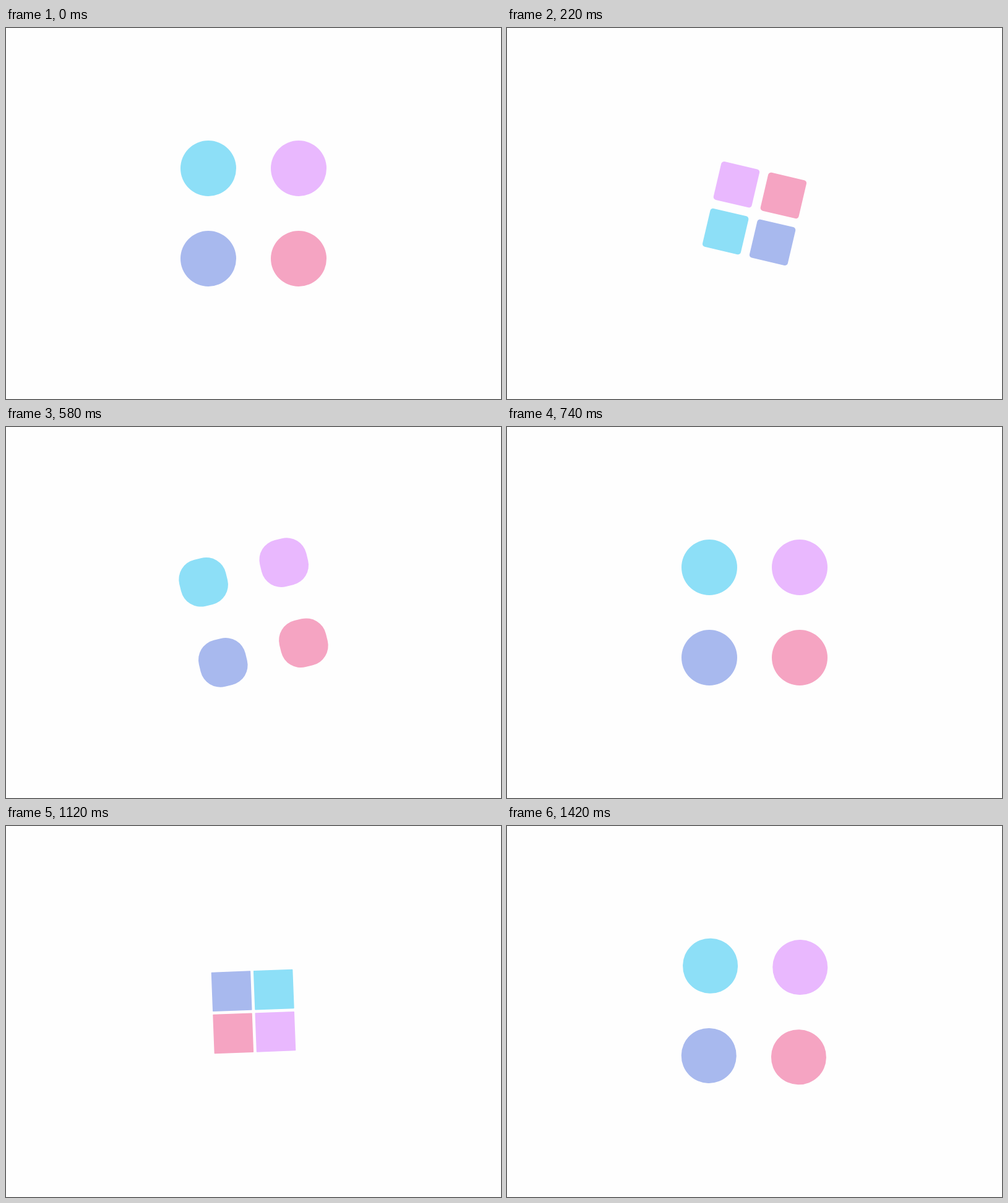
These frames come from a looping animation (800x600 px, 1440 ms). An HTML page with a canvas:

```html
<!DOCTYPE html>
<html lang="en">
<head>
<meta charset="utf-8">
<title>Four dot loader</title>
<style>
  html, body { margin: 0; width: 100%; height: 100%; overflow: hidden; background: #fefefe; }
  canvas { display: block; width: 800px; height: 600px; }
</style>
</head>
<body>
<canvas id="stage" width="800" height="600"></canvas>
<script>
const ctx = document.getElementById('stage').getContext('2d');

const LOOP = 1440;
const STEP = 20;
const DELAY = 18;
const QUARTER = 362.5;
const DOTS = [
  { x: -1, y: -1, color: '#8ddff7' },
  { x: 1, y: -1, color: '#e9b8fe' },
  { x: -1, y: 1, color: '#a8b9ee' },
  { x: 1, y: 1, color: '#f5a4c2' }
];

const mix = (a, b, k) => a + (b - a) * k;

// cubic-bezier(.25, .1, .25, 1), solved by bisection
function ease(x) {
  let lo = 0, hi = 1;
  for (let i = 0; i < 30; i++) {
    const s = (lo + hi) / 2;
    if (0.75 * s * (1 - s) + s ** 3 < x) lo = s; else hi = s;
  }
  const s = (lo + hi) / 2, r = 1 - s;
  return 0.3 * s * r * r + 3 * s * s * r + s ** 3;
}

// 0 = spread circles, 1 = packed squares; the turn reverses in the second half
function pose(time) {
  const phase = Math.max(0, (time - DELAY) / QUARTER);
  const part = Math.floor(phase);
  const eased = ease(phase - part);
  return {
    fold: part % 2 ? 1 - eased : eased,
    direction: part < 2 ? -1 : 1
  };
}

function draw(time) {
  const { fold, direction } = pose(time);
  const offset = mix(73, 33.15, fold);
  const size = mix(63.5, 90, (1 - fold) ** 4);
  const radius = size * 0.5 * (1 - fold);

  ctx.fillStyle = '#fefefe';
  ctx.fillRect(0, 0, 800, 600);
  ctx.save();
  ctx.translate(400, 300);
  ctx.rotate(direction * fold * Math.PI / 2);
  for (const dot of DOTS) {
    ctx.fillStyle = dot.color;
    ctx.beginPath();
    ctx.roundRect(dot.x * offset - size / 2, dot.y * offset - size / 2, size, size, radius);
    ctx.fill();
  }
  ctx.restore();
}

const start = performance.now();

function tick() {
  const elapsed = Math.max(0, performance.now() - start) % LOOP;
  draw(Math.floor(elapsed / STEP + 0.001) * STEP);
  requestAnimationFrame(tick);
}
tick();
</script>
</body>
</html>
```
